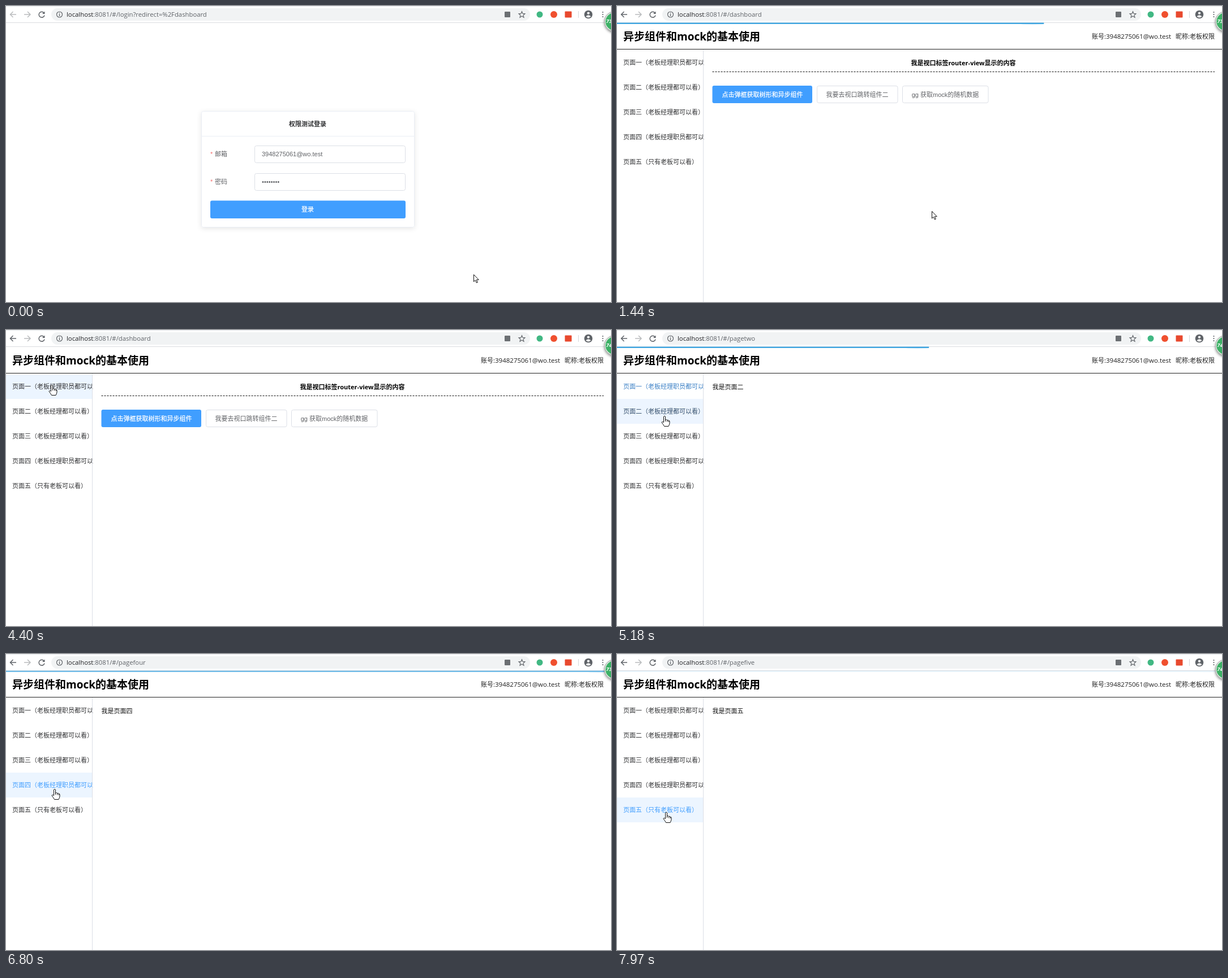
Write an HTML page that moves like this. It is 1069 by 524 pixels and loops after 8 s.

```html
<!DOCTYPE html>
<html lang="zh-CN">
<head>
<meta charset="utf-8">
<title>Login demo</title>
<style>
html, body { margin: 0; width: 100%; height: 100%; overflow: hidden; background: #fff; }
svg { display: block; width: 100vw; height: 100vh; }
text { font: 11px "Noto Sans", "Noto Sans CJK SC", "Noto Sans CJK", sans-serif; white-space: pre; }
.b { font-weight: 700; }
.m { text-anchor: middle; }
.ui { font-family: "Liberation Sans", "Noto Sans CJK SC", "Noto Sans CJK", sans-serif; fill: #606266; }
.white { fill: #fff; stroke: #fff; stroke-width: .25; font-weight: 500; }
.url { font: 11.3px "Open Sans", sans-serif; fill: #5f6368; }
.mail { font: 11.5px "Open Sans", sans-serif; }
.box { fill: #fff; stroke: #dcdfe6; }
.ico { fill: none; stroke: #5f6368; stroke-width: 1.5; }
</style>
</head>
<body>
<svg viewBox="0 0 1069 524" preserveAspectRatio="none">
  <defs>
    <filter id="shade" x="-10%" y="-10%" width="120%" height="125%">
      <feDropShadow dx="0" dy="2" stdDeviation="4.5" flood-opacity=".1"/>
    </filter>
    <filter id="drop" x="-30%" y="-30%" width="160%" height="170%">
      <feDropShadow dx="0" dy="2" stdDeviation="2" flood-opacity=".45"/>
    </filter>
    <filter id="glow" x="-20%" y="-300%" width="140%" height="700%"><feGaussianBlur stdDeviation="1.2"/></filter>
    <clipPath id="side"><rect y="78" width="154" height="446"/></clipPath>
    <clipPath id="below"><rect y="30" width="1069" height="12"/></clipPath>
  </defs>
  <rect width="1069" height="524" fill="#fff"/>

  <g id="login">
    <rect x="345.5" y="186.5" width="376" height="205" rx="3" fill="#fff" stroke="#ebeef5" filter="url(#shade)"/>
    <path d="M346 230.5H721" stroke="#ebeef5"/>
    <text class="b m" x="533" y="213" fill="#303133">权限测试登录</text>
    <text class="ui" x="361" y="266"><tspan fill="#f56c6c">*</tspan></text>
    <text class="ui" x="369" y="266">邮箱</text>
    <text class="ui" x="361" y="315"><tspan fill="#f56c6c">*</tspan></text>
    <text class="ui" x="369" y="315">密码</text>
    <rect class="box" x="439.5" y="247.5" width="266" height="30" rx="3"/>
    <rect class="box" x="439.5" y="296.5" width="266" height="30" rx="3"/>
    <text class="ui" x="452" y="266">3948275061@wo.test</text>
    <path d="M454 311.5H483" stroke="#606266" stroke-width="3" stroke-linecap="round" stroke-dasharray="0 3.9"/>
    <rect id="submit" x="361" y="344.5" width="345" height="31.5" rx="3"/>
    <text class="ui white m" x="533" y="364">登录</text>
  </g>

  <g id="app">
    <text class="b" x="11" y="61" style="font-size:19px">异步组件和mock的基本使用</text>
    <text x="839" y="57.5" fill="#222">账号:</text>
    <text class="mail" x="864" y="57.5" fill="#222">3948275061@wo.test</text>
    <text x="987" y="57.5" fill="#222">昵称:老板权限</text>
    <path d="M0 76.5H1069" stroke="#222"/>
    <g id="menu" clip-path="url(#side)"></g>
    <path d="M152.5 77V524" stroke="#dcdfe6"/>
    <g id="home">
      <text class="b m" x="612" y="105">我是视口标签router-view显示的内容</text>
      <path d="M168.5 116.5H1056" stroke="#111" stroke-dasharray="3 2"/>
      <rect x="168.5" y="141" width="176.5" height="31" rx="3" fill="#409eff"/>
      <text class="ui white m" x="257" y="161">点击弹框获取树形和异步组件</text>
      <rect class="box" x="353.5" y="141.5" width="142.5" height="30" rx="3"/>
      <text class="ui m" x="424.5" y="161">我要去视口跳转组件二</text>
      <rect class="box" x="504.5" y="141.5" width="151.5" height="30" rx="3"/>
      <text class="ui m" x="580" y="161">gg 获取mock的随机数据</text>
    </g>
    <text id="page" x="168.5" y="105" fill="#111"></text>
  </g>

  <path d="M0 .5H1069" stroke="#e8eaed"/>
  <path d="M0 29.5H1069" stroke="#dadce0"/>
  <rect x="80" y="4" width="846" height="22" rx="11" fill="#f1f3f4"/>
  <path id="back" class="ico" d="M18 15H8M12.5 10L7.5 15L12.5 20"/>
  <path class="ico" style="stroke:#babcbe" d="M32 15H42M38 10L43 15L38 20"/>
  <path class="ico" d="M67 12A5 5 0 1 0 68 16.5"/>
  <path d="M68.5 9.5V14H64Z" fill="#5f6368"/>
  <circle class="ico" cx="94.5" cy="15" r="5" style="stroke-width:1.2"/>
  <path class="ico" style="stroke-width:1.3" d="M94.5 14V18M94.5 11.7V13"/>
  <text class="url" x="107" y="19"><tspan fill="#202124">localhost</tspan><tspan>:8081/#/</tspan><tspan id="path"></tspan></text>
  <rect x="881" y="10" width="10" height="10" rx="1" fill="#6b6f73"/>
  <path class="ico" style="stroke-width:1.1" d="M911.5 9.7L913 13.4L917 13.7L914 16.3L915 20.2L911.5 18L908 20.2L909 16.3L906 13.7L910 13.4Z"/>
  <circle cx="943" cy="15" r="5.5" fill="#41b883"/>
  <circle cx="968" cy="15" r="6" fill="#f0502f"/>
  <rect x="987.5" y="9.5" width="12" height="11" rx="1" fill="#e8492e"/>
  <path d="M1011.5 9V21" stroke="#d5d7da"/>
  <circle cx="1029" cy="15" r="7.3" fill="#5f6368"/>
  <circle cx="1029" cy="12.6" r="2.2" fill="#fff"/>
  <path d="M1024.5 18.6Q1029 14 1033.5 18.6Q1029 22.5 1024.5 18.6Z" fill="#fff"/>
  <path d="M1054.5 11V20" stroke="#5f6368" stroke-width="2.2" stroke-linecap="round" stroke-dasharray="0 4"/>

  <g id="bar">
    <g clip-path="url(#below)">
      <ellipse id="peg" cy="31.5" rx="20" ry="1.2" fill="#29d" opacity=".25" filter="url(#glow)"/>
    </g>
    <rect id="fill" y="29.7" height="2" fill="#29d"/>
  </g>

  <circle cx="1075" cy="27.5" r="17.5" fill="#e9eeea" stroke="#9aa39c" filter="url(#drop)"/>
  <circle cx="1075" cy="27.5" r="15.7" fill="#3db166"/>
  <text id="badge" class="b" x="1060.5" y="29.5" fill="#fff" style="font-size:9px;font-style:italic"></text>

  <g id="cursor" stroke="#111" fill="#fff" stroke-linejoin="round">
    <path id="arrow" d="M-.5 .5V13L2.3 10.4L4.3 15L6.3 14.2L4.3 9.7H8.3Z"/>
    <path id="hand" d="M-1.5 1.2Q0 -.8 1.5 1.2V7Q4 5.6 4.6 7.6Q6.8 6.6 7.2 8.6Q9 8 9 10V13Q8.5 16 7 18.5H-.5Q-2 15.5 -5 11.6Q-4.5 9.4 -1.5 11.5ZM1.5 7V10M4.6 7.6V10.5M7.2 8.6V11"/>
  </g>
</svg>
<script>
const LOOP = 8000, APP = 1385;
const $ = id => document.getElementById(id);
const clamp = x => Math.max(0, Math.min(1, x));
const ease = x => 1 - (1 - clamp(x)) ** 3;
const show = (el, on) => el.setAttribute('display', on ? 'inline' : 'none');

const num = [...'一二三四五'];
const slug = ['one', 'two', 'three', 'four', 'five'];
const all = '老板经理职员都可以看', boss = '老板经理都可以看';
const who = [all, boss, boss, all, '只有老板可以看'];
const hovers = [3890, 5000, 5470, 6250, 7150];
const clicks = [4550, 5150, 5790, 6500, 7500];

// time, x, y
const track = [
  [70, 774, 460], [520, 774, 460], [750, 660, 410], [980, 557, 363], [1600, 557, 363],
  [1900, 625, 214], [2360, 983, 63], [2600, 983, 63], [2750, 1003, 56], [3000, 1010, 57],
  [3230, 1010, 57], [3720, 20, 100], [4000, 139, 113], [4250, 77, 92], [4400, 81, 97],
  [4850, 81, 97], [5000, 82, 122], [5150, 84, 152], [5330, 84, 152], [5470, 85, 166],
  [5640, 86, 188], [6130, 86, 188], [6250, 86, 210], [6330, 86, 239], [6980, 86, 239],
  [7150, 86, 254], [7270, 86, 273], [7350, 87, 280]
];

const rows = num.map((n, i) => {
  const y = 78 + 44 * i;
  $('menu').insertAdjacentHTML('beforeend',
    `<g><rect y="${y}" width="152" height="44" fill="#ecf5ff"/>` +
    `<text x="11" y="${y + 26}">页面${n}（${who[i]}）</text></g>`);
  return $('menu').lastChild;
});

function pointer(t) {
  if (t < 70) return [827, 475];
  const i = track.findIndex(k => k[0] > t);
  if (i < 0) return track[track.length - 1].slice(1);
  const a = track[i - 1], b = track[i], f = (t - a[0]) / (b[0] - a[0]);
  return [1, 2].map(k => a[k] + (b[k] - a[k]) * f);
}

// strength of a menu state that fades in and out over 300 ms
const level = (times, i, t) =>
  ease((t - times[i]) / 300) - (i < 4 ? ease((t - times[i + 1]) / 300) : 0);

const blend = f => 'rgb(' + [[48, 64], [49, 158], [51, 255]].map(([a, b]) => Math.round(a + (b - a) * f)) + ')';

function drawBar(t) {
  const dt = t - [APP, ...clicks].filter(s => s <= t).pop();
  const on = dt >= 0 && dt < 500;
  show($('bar'), on);
  if (!on) return;
  const w = 1069 * clamp(.28 + .0076 * dt);
  $('fill').setAttribute('width', w);
  $('peg').setAttribute('cx', w - 20);
  $('bar').setAttribute('opacity', 1 - clamp((dt - 230) / 270));
}

function render(t) {
  const app = t >= APP, page = clicks.filter(s => s <= t).length - 1;
  const [x, y] = pointer(t);
  const onSubmit = !app && x > 361 && x < 706 && y > 344 && y < 376;
  const onMenu = app && x < 152 && y > 78 && y < 298;

  show($('login'), !app);
  show($('app'), app);
  show($('home'), page < 0);
  $('submit').setAttribute('fill', !onSubmit ? '#409eff' : t > 1130 && t < 1210 ? '#3a8ee6' : '#66b1ff');
  $('back').style.stroke = app ? '#5f6368' : '#babcbe';
  $('path').textContent = !app ? 'login?redirect=%2Fdashboard' : page < 0 ? 'dashboard' : 'page' + slug[page];
  $('page').textContent = page < 0 ? '' : '我是页面' + num[page];
  $('badge').textContent = t < 2590 || (t >= 5790 && t < 7500) ? '73' : '74';

  rows.forEach((g, i) => {
    g.firstChild.setAttribute('opacity', level(hovers, i, t));
    g.lastChild.setAttribute('fill', blend(level(clicks, i, t)));
  });
  drawBar(t);

  const hand = onSubmit || onMenu;
  show($('hand'), hand);
  show($('arrow'), !hand);
  $('cursor').setAttribute('transform', `translate(${x} ${y})`);
}

const start = performance.now();
(function tick() {
  render((performance.now() - start) % LOOP);
  requestAnimationFrame(tick);
})();
</script>
</body>
</html>
```
